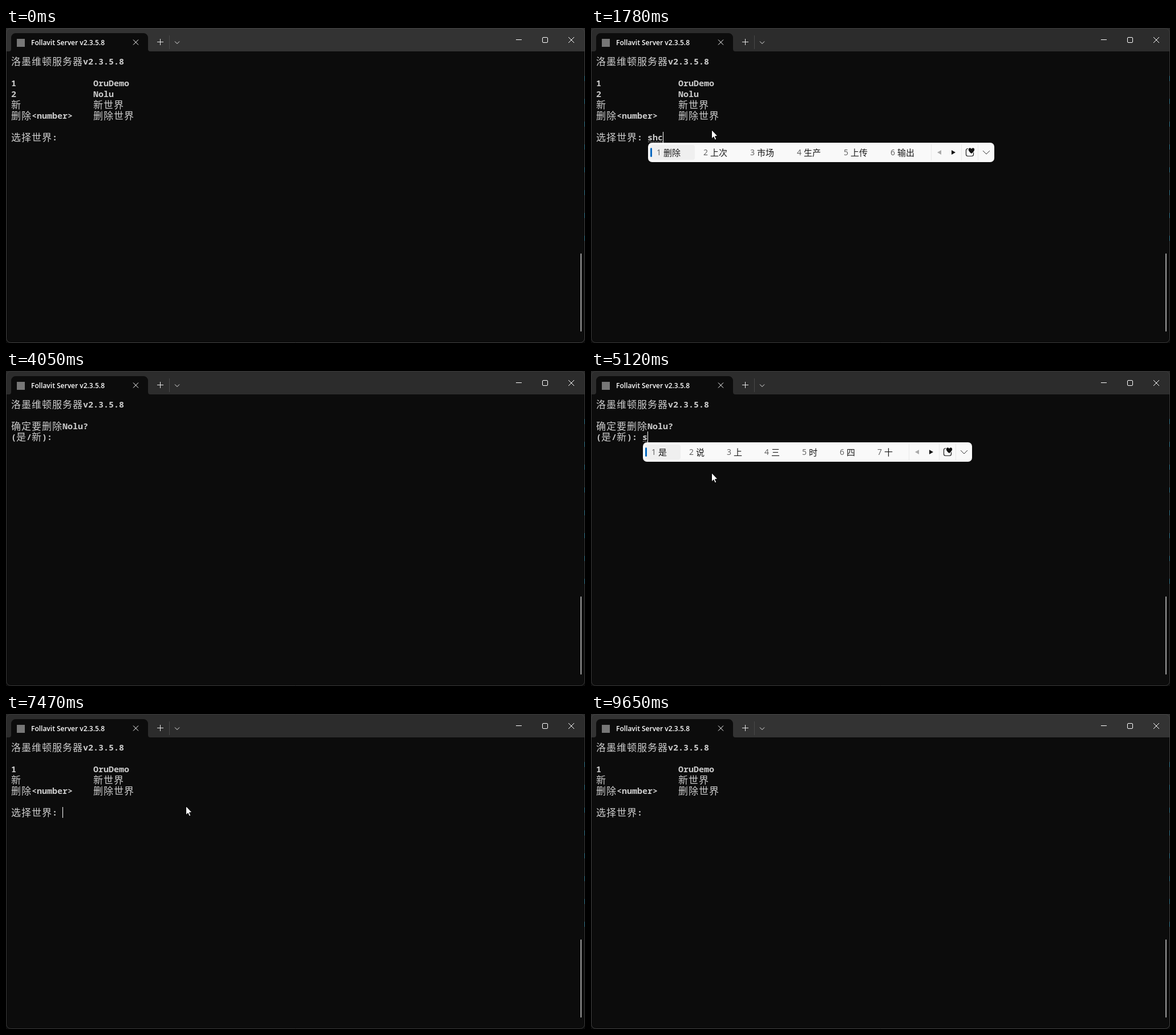
These frames come from a looping animation (1015 px wide and 552 px high, 9.77 s). An HTML page with a canvas:

```html
<!DOCTYPE html>
<html lang="zh">
<head>
<meta charset="utf-8">
<style>
  html, body { margin: 0; width: 100%; height: 100%; overflow: hidden; background: #0c0c0c; }
  canvas { display: block; }
</style>
</head>
<body>
<canvas id="stage" width="1015" height="552"></canvas>
<script>
const ctx = document.getElementById('stage').getContext('2d');
const LOOP = 9770;
const CELL = 9, LINE = 19, LEFT = 9, TOP = 49;
const MONO = '600 15px "Noto Sans Mono", monospace';
const CJK = '17px "Noto Sans CJK SC", "Noto Sans CJK", sans-serif';
const MENU = '15px "Noto Sans CJK SC", "Noto Sans CJK", sans-serif';

const VERSION = 'v2.3.5.8';
const HEADER = '洛墨维顿服务器' + VERSION;
const WORLDS = ['OruDemo', 'Nolu'];

const worldList = names => [HEADER, '',
  ...names.map((name, i) => String(i + 1).padEnd(16) + name),
  '新' + ' '.repeat(14) + '新世界',
  '删除<number>    删除世界', '', '选择世界: '];
const fullList = worldList(WORLDS);
const confirmation = [HEADER, '', `确定要删除${WORLDS[1]}?`, '(是/新): '];
const shortList = worldList(WORLDS.slice(0, 1));

const S_WORDS = ['是', '说', '上', '三', '时', '四', '十'];
const SH_WORDS = ['是', '说', '上', '时', '使', '书', '十'];
const SHC_WORDS = ['删除', '上次', '市场', '生产', '上传', '输出'];

// [start time, screen, typed text, input-method candidates]
const STEPS = [
  [0, fullList, ''],
  [930, fullList, 's', S_WORDS],
  [1460, fullList, 'sh', SH_WORDS],
  [1700, fullList, 'shc', SHC_WORDS],
  [2000, fullList, '删除'],
  [2600, fullList, '删除 '],
  [3140, fullList, '删除 2'],
  [3470, confirmation, ''],
  [4340, confirmation, '1'],
  [4710, confirmation, ''],
  [5000, confirmation, 's', S_WORDS],
  [5200, confirmation, '是'],
  [5820, shortList, '']
];
const FOCUS = [600, 9650];
const CARET_OFF = [[4050, 4340], [6480, 7020], [7550, 8080], [8620, 9150]];
const POINTER_SHOWN = [[40, 2600], [5000, 8790]];
// [time, x, y]
const POINTER_PATH = [
  [40, 880, 548], [200, 630, 385], [360, 360, 235], [480, 235, 172], [600, 211, 178],
  [7350, 211, 178], [7550, 383, 150], [7900, 0, 106], [8230, 142, 132],
  [8310, 190, 172], [8390, 275, 245], [8790, 880, 552]
];

const within = (t, [from, to]) => t >= from && t < to;
const isWide = ch => ch > '\u2e80';
const textWidth = text => [...text].reduce((w, ch) => w + (isWide(ch) ? 2 : 1) * CELL, 0);

function rect(x, y, w, h, color, radius = 0) {
  ctx.fillStyle = color;
  ctx.beginPath();
  ctx.roundRect(x, y, w, h, radius);
  ctx.fill();
}

function lines(color, ...paths) {
  ctx.strokeStyle = color;
  ctx.lineWidth = 1;
  ctx.beginPath();
  for (const path of paths)
    path.forEach(([x, y], i) => i ? ctx.lineTo(x, y) : ctx.moveTo(x, y));
  ctx.stroke();
}

function polygon(points, color) {
  ctx.fillStyle = color;
  ctx.beginPath();
  points.forEach(([x, y]) => ctx.lineTo(x, y));
  ctx.closePath();
  ctx.fill();
}

function label(text, x, y, font, color) {
  ctx.font = font;
  ctx.fillStyle = color;
  ctx.fillText(text, x, y);
}

const cross = (x, y, size) =>
  lines('#fff', [[x, y], [x + size, y + size]], [[x + size, y], [x, y + size]]);
const chevron = (x, y, w, h, color) => lines(color, [[x, y], [x + w / 2, y + h], [x + w, y]]);

function gridText(text, x, row) {
  const y = TOP + row * LINE;
  for (const ch of text) {
    const wide = isWide(ch);
    label(ch, x, y + (wide ? 16 : 15), wide ? CJK : MONO, '#ccc');
    x += wide ? 2 * CELL : CELL;
  }
}

function drawWindow(focused) {
  rect(0, 0, 1015, 552, '#0c0c0c');
  rect(0, 0, 1015, 41, focused ? '#2c2c2c' : '#333');

  // active tab with flared feet
  ctx.fillStyle = '#0c0c0c';
  ctx.beginPath();
  ctx.moveTo(5, 41);
  ctx.arcTo(9, 41, 9, 37, 4);
  ctx.arcTo(9, 9, 17, 9, 8);
  ctx.arcTo(249, 9, 249, 17, 8);
  ctx.arcTo(249, 41, 253, 41, 4);
  ctx.fill();

  rect(19, 19, 14, 14, '#777');
  label('Follavit Server ' + VERSION, 44, 30, '600 12px "Open Sans", sans-serif', '#fff');
  cross(223, 20.5, 9);
  lines('#e8e8e8', [[265, 24.5], [276, 24.5]], [[270.5, 19], [270.5, 30]]);
  lines('#484848', [[286.5, 13], [286.5, 37]]);
  chevron(296, 23.5, 8, 4, '#e8e8e8');

  lines('#fff', [[894, 20.5], [904, 20.5]]);
  ctx.beginPath();
  ctx.roundRect(940.5, 16.5, 9, 9, 1.5);
  ctx.stroke();
  cross(986, 16, 10);

  rect(1007, 395, 2, 137, '#9d9d9d', 1);
  ctx.strokeStyle = focused ? '#3a3a3a' : '#434343';
  ctx.beginPath();
  ctx.roundRect(0.5, 0.5, 1014, 551, 8);
  ctx.stroke();
  // desktop showing through at the right edge
  for (let y = 84; y < 390; y += 40) rect(1014, y, 1, 9, '#34788f');
}

function drawCandidates(words, x, y) {
  const slot = 50 + 16 * words[0].length;
  const end = x + 4 + slot * words.length;
  const right = end + 111;
  rect(x, y, right - x, 34, '#f9f9f9', 7);
  rect(x + 4, y + 4, slot - 4, 26, '#efefef', 4);
  rect(x + 4, y + 9, 3, 16, '#0067c0', 1.5);
  words.forEach((word, i) => {
    const left = x + 15 + i * slot;
    label(i + 1, left, y + 22, '14px "Open Sans", sans-serif', '#5c5c5c');
    label(word, left + 12, y + 22.5, MENU, '#1a1a1a');
  });

  for (const offset of [0, 53, 82])
    lines('#e9e9e9', [[end + offset + .5, y + 3], [end + offset + .5, y + 31]]);
  const mid = y + 17;
  polygon([[end + 11, mid], [end + 18, mid - 4], [end + 18, mid + 4]], '#aaa');
  polygon([[end + 43, mid], [end + 36, mid - 4], [end + 36, mid + 4]], '#111');

  // sticker button: open rounded square and heart
  ctx.strokeStyle = '#1a1a1a';
  ctx.lineWidth = 1.2;
  ctx.beginPath();
  ctx.roundRect(end + 61.5, mid - 6.5, 13, 13, 3);
  ctx.stroke();
  const hx = end + 71, hy = mid - 4;
  ctx.beginPath();
  ctx.moveTo(hx, hy + 6);
  ctx.bezierCurveTo(hx - 10, hy - 1, hx - 3, hy - 7, hx, hy - 2);
  ctx.bezierCurveTo(hx + 3, hy - 7, hx + 10, hy - 1, hx, hy + 6);
  ctx.strokeStyle = '#f9f9f9';
  ctx.lineWidth = 2;
  ctx.stroke();
  ctx.fillStyle = '#111';
  ctx.fill();
  chevron(end + 91, mid - 3, 12, 6, '#333');
}

function pointerAt(t) {
  const next = POINTER_PATH.findIndex(key => key[0] > t);
  const [t0, x0, y0] = POINTER_PATH[next - 1], [t1, x1, y1] = POINTER_PATH[next];
  const k = (t - t0) / (t1 - t0);
  return [Math.round(x0 + (x1 - x0) * k), Math.round(y0 + (y1 - y0) * k)];
}

function drawPointer(x, y) {
  const shape = [[.5, .5], [.5, 16], [4, 12.7], [6.3, 18], [8.8, 17], [6.5, 11.8], [11, 11.5]];
  const points = shape.map(([dx, dy]) => [x + dx, y + dy]);
  polygon(points, '#fff');
  lines('#000', [...points, points[0]]);
}

function draw(t) {
  const [, screen, typed, words] = STEPS.findLast(step => step[0] <= t);
  const focused = within(t, FOCUS);
  drawWindow(focused);
  screen.forEach((line, row) => gridText(line, LEFT, row));

  const row = screen.length - 1;
  const inputX = LEFT + textWidth(screen[row]);
  const caretX = inputX + textWidth(typed);
  const rowY = TOP + row * LINE;
  gridText(typed, inputX, row);
  if (words) {
    for (let x = inputX + 1; x < caretX; x += 3) rect(x, rowY + 17, 1.5, 1, '#ccc');
    drawCandidates(words, inputX + 1, rowY + LINE);
  }
  if (focused && !CARET_OFF.some(span => within(t, span))) rect(caretX, rowY, 1, LINE, '#fff');
  if (POINTER_SHOWN.some(span => within(t, span))) drawPointer(...pointerAt(t));
}

const start = performance.now();
function tick() {
  draw((performance.now() - start) % LOOP);
  requestAnimationFrame(tick);
}
tick();
</script>
</body>
</html>
```
